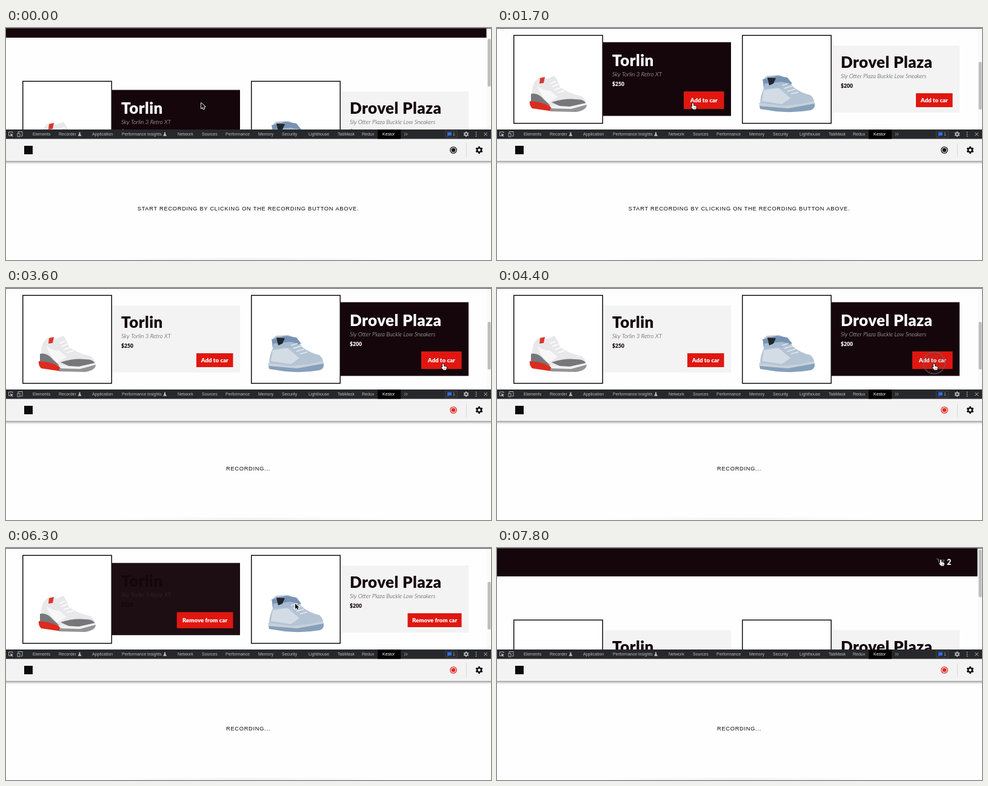
Animation, 800 px wide and 384 px high, one loop 8 s. Source, as an HTML page with a canvas:

```html
<!DOCTYPE html>
<html lang="en">
<head>
<meta charset="utf-8">
<title>Shop recording demo</title>
<style>
html, body { margin: 0; width: 800px; height: 384px; overflow: hidden; background: #fefefe; }
canvas { display: block; }
</style>
</head>
<body>
<canvas id="stage" width="800" height="384"></canvas>
<script>
const c = document.getElementById('stage').getContext('2d');
const LOOP = 8000;
const SANS = '"Liberation Sans", Arial, sans-serif';
const LATO = 'Lato, sans-serif';
const DARK = [21, 6, 11], LIGHT = [243, 243, 243];

// Each key is [time, value, value...].
const SCROLL = [[100, 88], [900, 12], [6330, 12], [6680, -11.5], [6900, -11.5], [7450, 119]];
const POINTER = [
  [1900, 322, 124], [2150, 560, 125], [2300, 700, 140], [2500, 737, 211],
  [3050, 737, 211], [3500, 720, 125], [4650, 720, 125], [5350, 340, 122],
  [6150, 340, 122], [6300, 477, 92], [6600, 595, 69], [7050, 595, 69], [7650, 731, 19]
];
// Each span is [enter, leave].
const HAND = [[1050, 1960], [2250, 2310], [2480, 3080], [3420, 4700], [5290, 6200], [7580, LOOP]];
const BEAM = [[6560, 7080]];
const CARDS = [
  { x: 27, name: 'Torlin', model: 'Sky Torlin 3 Retro XT', price: '$250', added: 5700,
    hover: [[-999, 2000], [5150, 6270]], press: [[1000, 1960], [5290, 6225]] },
  { x: 404, name: 'Drovel Plaza', model: 'Sly Otter Plaza Buckle Low Sneakers', price: '$200', added: 4500,
    hover: [[2130, 2330], [3200, 4800], [6420, 7180]], press: [[2250, 2310], [3420, 4700]] }
];
const CLICKS = [[2860, 738, 205], [4300, 721, 124], [5600, 341, 122]];
const RECORD_AT = 2900;

const SHOES = [[
  ['#e8e8ea', 'M58 122C57 104 58 88 70 82Q76 80 83 84L95 79Q101 88 104 98Q118 108 140 113Q148 120 147 127L120 136 58 133Z'],
  ['#f7f7f8', 'M66 96Q78 104 88 104L100 114 84 124 74 112Z'],
  ['#d8382b', 'M71 83L79 81 77 91 70 92Z'],
  ['#77777b', 'M56 109Q68 106 78 119L88 128 56 122Z'],
  ['#77777b', 'M90 123Q112 116 130 118 146 118 147 127L110 132Z'],
  ['#dd2b1e', 'M54 121L70 123 92 130 92 138 58 133Q53 128 54 121Z'],
  ['#f1f1f1', 'M86 128L120 130 147 124 148 129 122 135 90 133Z'],
  ['#949497', 'M88 133L122 134 148 127Q148 136 130 139L88 138Z']
], [
  ['#b4c4d5', 'M434 126Q434 112 440 100Q436 84 446 79L466 78 480 84 488 97Q500 107 517 111Q525 118 523 128L480 134 434 132Z'],
  ['#d3dce5', 'M440 103L464 99 484 116 470 126 437 121Z'],
  ['#7893b4', 'M438 85L462 79 479 82 487 92 470 97 441 99Z'],
  ['#a7bcd2', 'M441 92L470 89 482 92 470 99 441 100Z'],
  ['#22262c', 'M446 82L460 83 456 92 449 95Z'],
  ['#c9d1d8', 'M432 124L470 129 500 126 523 121 524 127 480 135 433 130Z'],
  ['#86a0bb', 'M433 129L480 133 524 125Q525 133 518 136 490 141 460 138L434 134Z']
]].map(parts => parts.map(([color, d]) => [color, new Path2D(d)]));
const LACES = [new Path2D('M88 92l9 -4M91 97l10 -4M95 102l10 -3M100 107l11 -3'),
               new Path2D('M470 95l11 -3M474 100l13 -4M479 105l13 -4M485 109l12 -3')];
const ARROW = new Path2D('M0 0V9L2.2 7.1 3.7 10.3 5.3 9.6 3.9 6.5H6.7Z');
const FIST = new Path2D('M0 1Q1-.5 2 1V4.5L5.5 5Q7 5.4 7 7L6 10.5H1.5L-1.8 6.8Q-2 5.2 0 6.4Z');

const clamp = v => Math.max(0, Math.min(1, v));
const smooth = v => v * v * (3 - 2 * v);
const inside = (spans, t) => spans.some(([a, b]) => t >= a && t < b);
const fade = (spans, t, ms) =>
  Math.max(...spans.map(([a, b]) => smooth(clamp((t - a) / ms)) * (1 - smooth(clamp((t - b) / ms)))));
const mix = (a, b, k) => `rgb(${a.map((v, i) => Math.round(v + (b[i] - v) * k))})`;

function track(keys, t) {
  const i = keys.findIndex(k => k[0] > t);
  if (i === 0) return keys[0].slice(1);
  if (i < 0) return keys[keys.length - 1].slice(1);
  const a = keys[i - 1], b = keys[i], k = smooth((t - a[0]) / (b[0] - a[0]));
  return a.slice(1).map((v, j) => v + (b[j + 1] - v) * k);
}

function rect(x, y, w, h, color) {
  c.fillStyle = color;
  c.fillRect(x, y, w, h);
}

function text(s, x, y, font, color, align = 'left', spacing = 0) {
  c.font = font;
  c.fillStyle = color;
  c.textAlign = align;
  c.letterSpacing = spacing + 'px';
  c.fillText(s, x, y);
}

function line(d, color, width = 1) {
  c.strokeStyle = color;
  c.lineWidth = width;
  c.stroke(typeof d === 'string' ? new Path2D(d) : d);
}

function shape(d, color) {
  c.fillStyle = color;
  c.fill(typeof d === 'string' ? new Path2D(d) : d);
}

function circle(x, y, r, fill, stroke, width = 1) {
  const p = new Path2D();
  p.arc(x, y, r, 0, 7);
  if (fill) shape(p, fill);
  if (stroke) line(p, stroke, width);
}

function gear(x, y, r, color) {
  c.save();
  c.translate(x, y);
  for (let i = 0; i < 6; i++) {
    rect(-r * .24, -r, r * .48, r * .5, color);
    c.rotate(Math.PI / 3);
  }
  circle(0, 0, r * .57, null, color, r * .4);
  c.restore();
}

function drawCard(card, i, top, t) {
  const hover = fade(card.hover, t, 280), grow = 3 * fade(card.press, t, 180);
  const on = inside(card.hover, t), ink = on ? '#fff' : '#15060b';
  const pad = 2.5 * hover + grow, x = card.x + 163, right = card.x + 347.5;
  rect(card.x + 148, top + 17 - pad, 211, 111 + 2 * pad, mix(LIGHT, DARK, hover));
  text(card.name, x, top + 54 - grow, '900 26px ' + LATO, ink, 'left', .4);
  text(card.model, x, top + 71 - grow, 'italic 300 9.7px ' + LATO, on ? '#ddd' : '#333');
  text(card.price, x, top + 87 - grow, '900 8.6px ' + LATO, ink);

  const added = t >= card.added, w = (added ? 89 : 60.5) + 2 * grow;
  rect(right - w, top + 96 - grow, w, 23 + 2 * grow, '#e01710');
  text(added ? 'Remove from car' : 'Add to car', right - w / 2, top + 110.5, '900 9.7px ' + LATO, '#fff', 'center');

  rect(card.x, top, 148, 146, '#fff');
  c.save();
  c.translate(0, top - 12);
  SHOES[i].forEach(([color, path]) => shape(path, color));
  line(LACES[i], i ? '#e4eaf0' : '#fff', 1.5);
  c.restore();
  c.strokeStyle = '#111';
  c.lineWidth = 1.5;
  c.strokeRect(card.x + .75, top + .25, 146.5, 145.5);
}

function drawPage(top, t) {
  c.save();
  c.beginPath();
  c.rect(0, 0, 800, 168);
  c.clip();
  CARDS.forEach((card, i) => drawCard(card, i, top, t));
  rect(0, top - 120, 793, 48, '#15060b');
  c.save();
  c.translate(725, top - 101);
  line('M0 0H2.5L4.5 7H11L12.5 2H3.5M4.5 4.5H11.5', '#77777a', 1.2);
  circle(5.5, 9.5, 1, '#77777a');
  circle(10, 9.5, 1, '#77777a');
  c.restore();
  const count = CARDS.filter(card => t >= card.added).length;
  text(count, 742, top - 91, '900 12.5px ' + LATO, '#fff');
  rect(792.5, 0, 7.5, 168, '#fafafa');
  c.beginPath();
  c.roundRect(794.5, 18 + (88 - top) / 2, 5, 79, 2.5);
  c.fillStyle = '#bdbdbd';
  c.fill();
  rect(0, 0, 800, 1, '#444');
  c.restore();
}

const TABS = [['Elements', 44], ['Recorder', 87], ['Application', 142], ['Performance insights', 191],
  ['Network', 283], ['Sources', 323], ['Performance', 362], ['Memory', 416], ['Security', 455],
  ['Lighthouse', 499], ['TabMask', 547], ['Redux', 587], ['Kestor', 621]];

function drawTabs() {
  const gray = '#b8bbbf';
  rect(0, 168, 800, 15.5, '#27282b');
  rect(613, 168, 38, 15.5, '#000');
  TABS.forEach(([name, x]) => text(name, x, 178.3, '7px ' + SANS, name === 'Kestor' ? '#fff' : gray));
  line('M10 178.5H4.5V172H11V174', gray, .9);
  shape('M7 174.5L12 176.5 10 177.3 11.5 179.5 10.6 180 9.3 178 8 179.5Z', gray);
  line('M20 174V171.5H27V179H24.5M19 174.5H23V180H19Z', gray, .9);
  for (const x of [121.5, 262]) shape(`M${x - 1} 172.5h2v2.4l2 3.8h-6l2 -3.8Z`, gray);
  line('M657 173.5l2 2.3l-2 2.3M660 173.5l2 2.3l-2 2.3', gray, .8);
  line('M724.5 170.5H744.5V181H724.5Z', '#4a4c50', .8);
  shape('M728 172.5H735V178H730L728 180Z', '#2f6de0');
  text('1', 737, 178.3, '7px ' + SANS, gray);
  gear(759, 175.7, 4.3, gray);
  for (const y of [172.5, 175.7, 178.9]) circle(775.5, y, .85, gray);
  line('M788.5 173l5.5 5.5M794 173l-5.5 5.5', gray, 1);
}

function drawPanel(t) {
  const recording = t >= RECORD_AT, ink = recording ? '#e4281f' : '#0c0c0c';
  rect(0, 183.5, 800, 200.5, '#fefefe');
  c.save();
  c.shadowColor = 'rgba(0,0,0,.45)';
  c.shadowBlur = 4;
  c.shadowOffsetY = 1.5;
  rect(-10, 183.5, 820, 36.5, '#f3f3f3');
  c.restore();
  drawTabs();
  rect(30, 195, 14, 14, '#0c0c0c');
  rect(759, 191, 1, 22.5, '#d9d9d9');

  const halo = fade([[2430, 3080]], t, 150);
  if (halo) circle(738, 202, 11.5, `rgba(0,0,0,${.06 * halo})`);
  circle(738, 202, 5.2, null, ink, 1.3);
  circle(738, 202, 3.3, ink);
  gear(780.5, 202, 6, '#0c0c0c');

  text(recording ? 'RECORDING...' : 'START RECORDING BY CLICKING ON THE RECORDING BUTTON ABOVE.',
    399.5, 301.7, '9.3px ' + SANS, '#0c0c0c', 'center', .69);

  const glow = c.createLinearGradient(165, 0, 640, 0);
  glow.addColorStop(0, 'rgba(0,0,0,0)');
  glow.addColorStop(.5, 'rgba(0,0,0,.035)');
  glow.addColorStop(1, 'rgba(0,0,0,0)');
  rect(165, 380, 475, 4, glow);

  c.globalAlpha = fade([[2480, 3060]], t, 120);
  c.beginPath();
  c.roundRect(712, 222, 53, 14, 2);
  c.fillStyle = '#5b5b5b';
  c.fill();
  text('Start recording', 738.5, 231.3, '6.5px ' + SANS, '#fff', 'center');
  c.globalAlpha = 1;
}

function drawPointer(t) {
  for (const [at, x, y] of CLICKS) {
    const k = (t - at) / 300;
    if (k < 0 || k >= 1) continue;
    c.globalAlpha = Math.min(1, 2 * (1 - k));
    circle(x, y, 13 + 15 * k, 'rgba(90,90,90,.12)', 'rgba(110,100,100,.75)', 1.3);
    c.globalAlpha = 1;
  }
  const [x, y] = track(POINTER, t);
  c.save();
  c.translate(x, y);
  c.lineJoin = 'round';
  if (inside(HAND, t)) {
    line(FIST, '#111', 1.6);
    shape(FIST, '#fff');
    line('M3.3 7v2M5 7v2', '#333', .6);
  } else if (inside(BEAM, t)) {
    const beam = 'M-2.5 -4.5Q0 -4.5 0 -3Q0 -4.5 2.5 -4.5M0 -3V3M-2.5 4.5Q0 4.5 0 3Q0 4.5 2.5 4.5';
    line(beam, '#fff', 2);
    line(beam, '#333', .9);
  } else {
    line(ARROW, '#fff', 1.7);
    shape(ARROW, '#0a0a0a');
  }
  c.restore();
}

function frame(now) {
  const t = now % LOOP;
  rect(0, 0, 800, 384, '#fefefe');
  drawPage(track(SCROLL, t)[0], t);
  drawPanel(t);
  drawPointer(t);
  requestAnimationFrame(frame);
}
requestAnimationFrame(frame);
</script>
</body>
</html>
```
